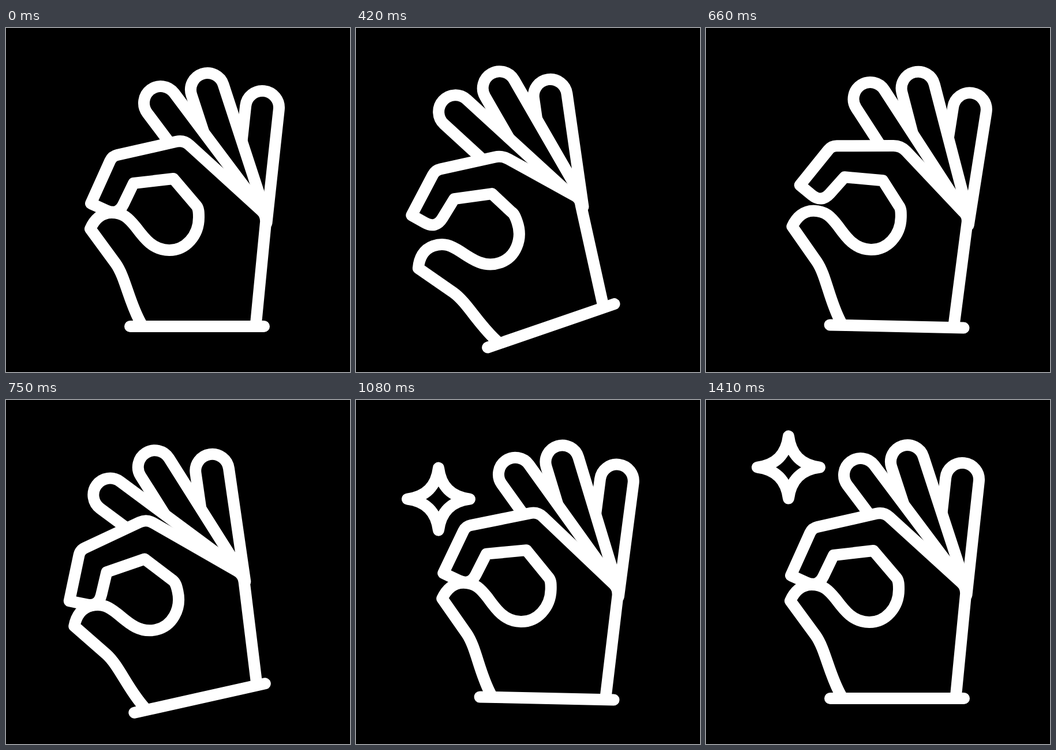
An HTML page that plays this animation: 596 px wide and 596 px high, repeating every 1500 ms.

```html
<!DOCTYPE html>
<html lang="en">
<head>
<meta charset="utf-8">
<title>Perfect gesture</title>
<style>
  html, body { margin: 0; height: 100%; overflow: hidden; background: #000; }
  svg { display: block; width: 100vw; height: 100vh; }
</style>
</head>
<body>
<svg viewBox="0 0 596 596" stroke="#fff" stroke-width="20" stroke-linecap="round" stroke-linejoin="round">
  <g id="arm">
    <path id="little"/>
    <path id="ring"/>
    <path id="middle"/>
    <path id="hand"/>
    <path d="M215 517H447"/>
  </g>
  <path id="star" fill="none" d="M0-54Q6-6 54 0Q6 6 0 54Q-6 6-54 0Q-6-6 0-54Z"/>
</svg>
<script>
const LOOP = 1500, STEP = 30, END = 1410;
const $ = id => document.getElementById(id);
const place = (id, transform) => $(id).setAttribute('transform', transform);
const ease = p => (1 - Math.cos(Math.PI * Math.min(1, Math.max(0, p)))) / 2;
const lerp = (a, b, k) => a + (b - a) * k;

// Eased value between [time, value] keys.
function at(keys, t) {
  const next = keys.findIndex(key => key[0] > t);
  if (next < 1) return keys[next ? keys.length - 1 : 0][1];
  const [t0, a] = keys[next - 1], [t1, b] = keys[next];
  return lerp(a, b, ease((t - t0) / (t1 - t0)));
}

const swing = [[205, 0], [385, -22], [577, 16], [740, -12.6], [985, 2.4], [1180, 0]];
const bend = [[205, 0], [300, .42], [540, 1], [750, -.27], [900, -.55], [1080, 0]];

// Tip centre, lean, lengths of both sides, distance to the pivot, degrees of bend each way.
const fingers = [
  { id: 'little', x: 444, y: 138, lean: 6.2, left: 80, right: 198, pivot: 192, forth: 6.5, back: 7 },
  { id: 'ring', x: 349, y: 107, lean: -18.1, left: 110, right: 225, pivot: 263, forth: 10, back: 6 },
  { id: 'middle', x: 268, y: 130, lean: -36.9, left: 85, right: 240, pivot: 220, forth: 11.7, back: 15 }
];
for (const { id, left, right } of fingers)
  $(id).setAttribute('d', `M-29 ${left}V0A29 29 0 0 1 29 0V${right}`);

// Index finger joints: closed x, y, opened x, y, corner rounding.
const joints = [
  [308, 194, 362, 217, 13],
  [184, 222, 247, 187, 9],
  [147, 304, 172, 239, 0],
  [194, 325, 198, 281, 22],
  [221, 269, 253, 249, 0],
  [290, 261, 316, 270, 0]
];
const palm = 'L330 308C334 313 334 320 334 328C334 360 311 385 283 385' +
  'C255 385 240 365 225 345C212 329 203 320 183 320C165 320 153 332 146 348' +
  'L190 408C207 432 213 475 234 512';

// Point at distance r from p towards q.
function toward(p, q, r) {
  const k = r / Math.hypot(q[0] - p[0], q[1] - p[1]);
  return [lerp(p[0], q[0], k), lerp(p[1], q[1], k)];
}

function handPath(open) {
  const points = joints.map(([x, y, u, v]) => [lerp(x, u, open), lerp(y, v, open)]);
  const index = points.map((p, i) => {
    const r = joints[i][4];
    const before = points[i - 1] || [442, 316], after = points[i + 1] || [330, 308];
    return `L${toward(p, before, r)}Q${p} ${toward(p, after, r)}`;
  });
  return `M${433 - 7 * open} 512L${450 - 3 * open} 337Q451 324 442 316` + index.join('') + palm;
}

function draw() {
  const t = Math.min(END, Math.floor((performance.now() - start) % LOOP / STEP) * STEP);
  place('arm', `rotate(${at(swing, t)} 331 496)`);
  $('hand').setAttribute('d', handPath(ease((t - 205) / 335) * ease((760 - t) / 220)));

  const amount = at(bend, t);
  for (const { id, x, y, lean, pivot, forth, back } of fingers)
    place(id, `translate(${x} ${y}) rotate(${lean}) rotate(${amount * (amount > 0 ? forth : back)} 0 ${pivot})`);

  const size = ease((t - 900) / 150);
  place('star', `translate(143 ${196 - .000145 * (t - 670) ** 2}) scale(${size})`);
  $('star').style.display = size > 0 ? '' : 'none';
  requestAnimationFrame(draw);
}

const start = performance.now();
draw();
</script>
</body>
</html>
```
